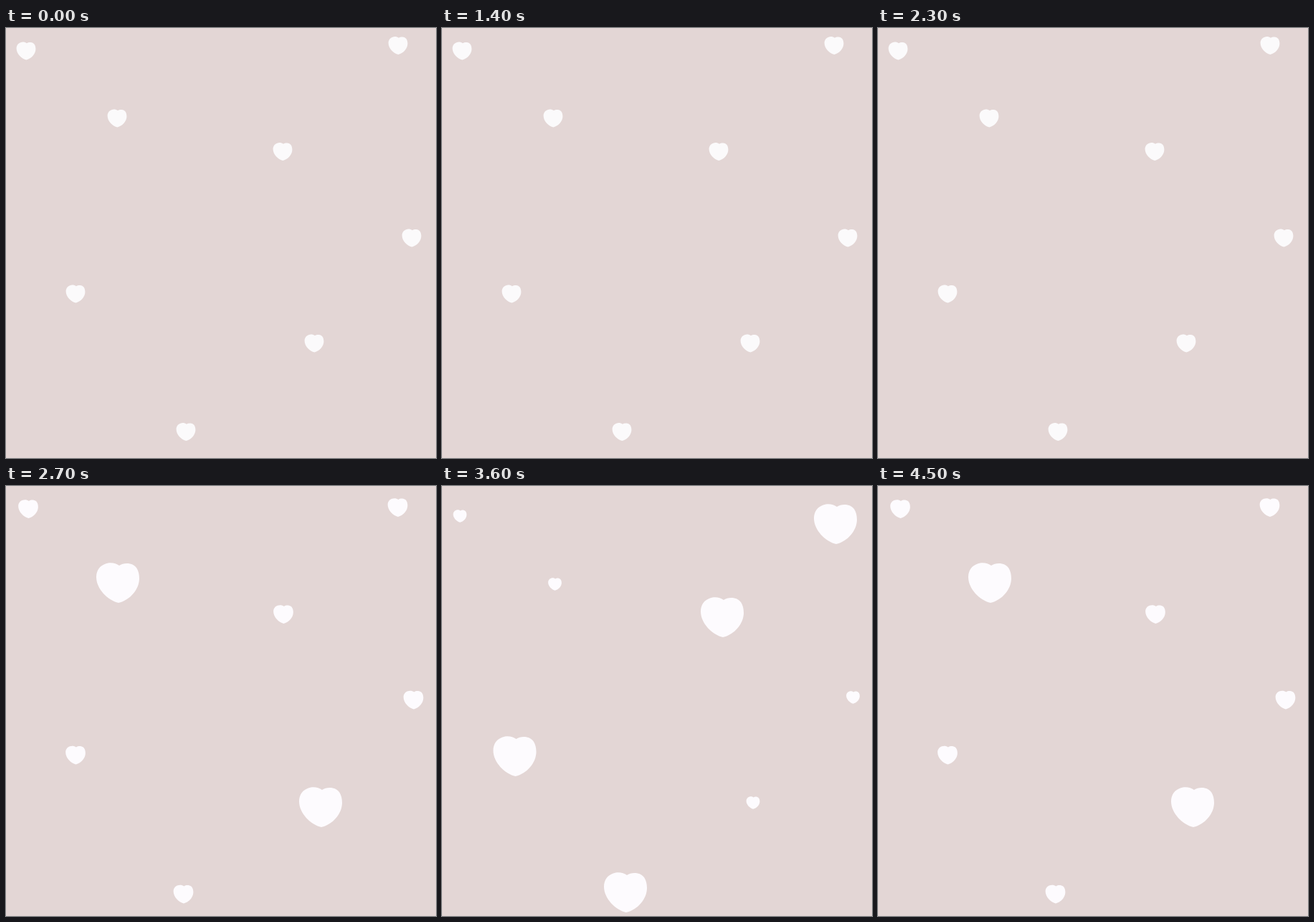
Write an HTML page that moves like this. It is 600x600 px and loops after 4.7 s.

```html
<!DOCTYPE html>
<html lang="en">
<head>
<meta charset="utf-8">
<title>Blinking hearts</title>
<style>
  html, body { margin: 0; width: 100%; height: 100%; overflow: hidden; background: #e3d6d5; }
  svg { display: block; width: 100%; height: 100%; fill: #fdfbfe; }
  path { filter: blur(.5px); }
  .rest { fill: #fbfafb; }
</style>
</head>
<body>
<svg viewBox="0 0 600 600"></svg>
<script>
// A heart 60 wide, centred on the origin.
const HEART = "M2-24C-3-28-11-29-17-26.5C-25-24-30-17-30-8C-30 8.5-14 24.5 1 28C17 24.5 30 9 30-6C30-18 25-25 17-26.5C11-27.5 6-26.5 2-24Z";
const LOOP = 4700;
const BEATS_PER_TICK = 0.225;
const POSES = ["rest", "swell", "rest", "echo"];

// Where each heart sits. The first four grow in "swell", the next two in "echo".
const hearts = [
  { rest: [547, 24.5], swell: [549, 53], echo: [546.5, 30] },
  { rest: [386, 172.5], swell: [391, 183], echo: [387, 179] },
  { rest: [97, 371], swell: [101.5, 377], echo: [97, 375.5] },
  { rest: [251, 563.5], swell: [256, 567], echo: [247.5, 569.5] },
  { rest: [155, 126], swell: [157.5, 137], echo: [156, 135] },
  { rest: [430, 440], swell: [434, 442], echo: [439, 448] },
  { rest: [28, 32], swell: [25, 42], echo: [31, 32] },
  { rest: [566, 293], swell: [573.5, 295], echo: [568.5, 298.5] }
];
const widthOf = {
  rest: () => 26.8,
  swell: i => i < 4 ? 60 : 18.8,
  echo: i => i === 4 || i === 5 ? 60 : 27.7
};

const svg = document.querySelector("svg");
svg.innerHTML = `<path d="${HEART}"/>`.repeat(hearts.length);
const paths = [...svg.children];

// The pose changes every 4/9 s, rounded to ticks of 100 ms.
function poseAt(time) {
  const tick = Math.floor(time / 100);
  const beat = Math.ceil((tick - 0.25) * BEATS_PER_TICK);
  return POSES[beat % POSES.length];
}

function draw() {
  const pose = poseAt(performance.now() % LOOP);
  svg.setAttribute("class", pose);
  paths.forEach((path, i) => {
    const scale = widthOf[pose](i) / 60;
    path.setAttribute("transform", `translate(${hearts[i][pose]}) scale(${scale})`);
  });
  requestAnimationFrame(draw);
}
draw();
</script>
</body>
</html>
```
